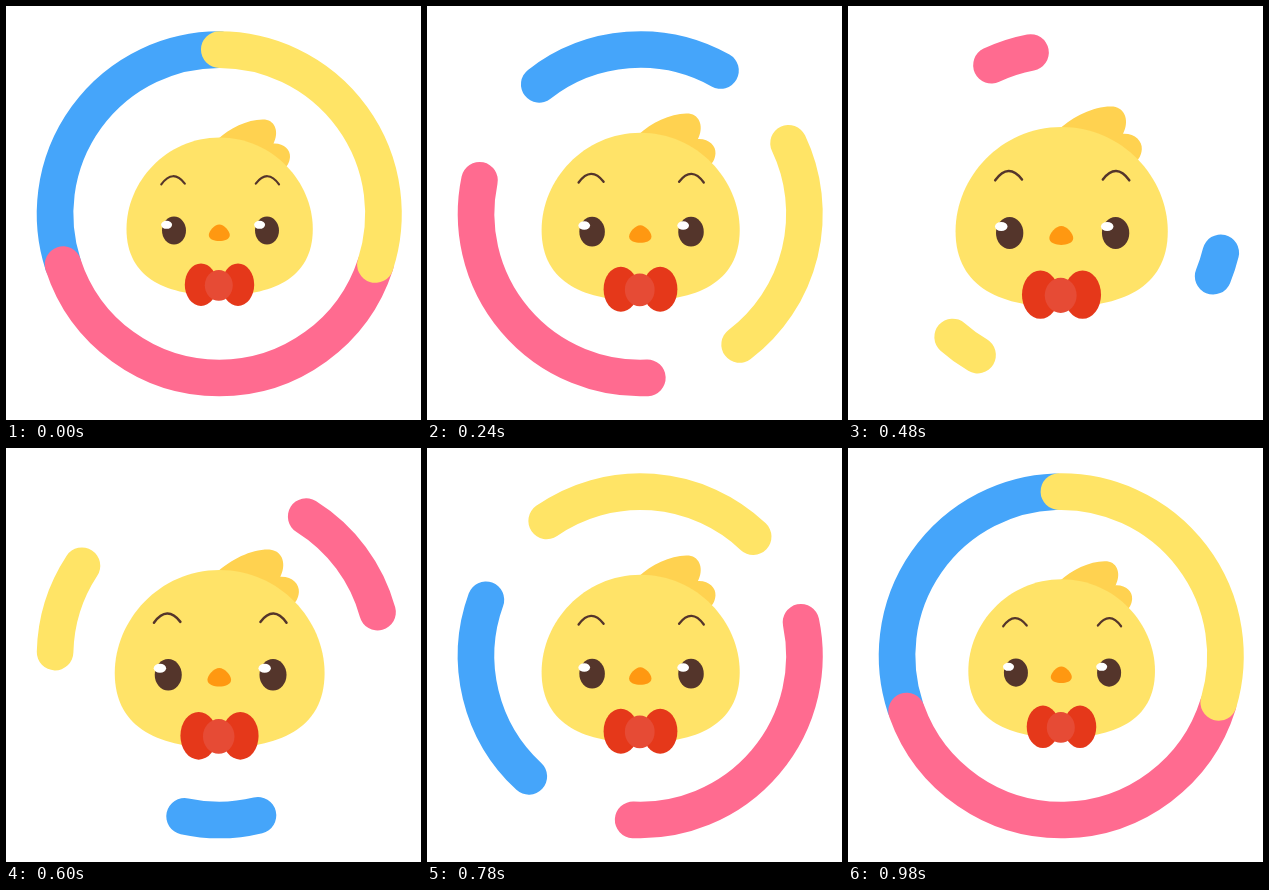
Write an HTML page that moves like this. It is 415 px wide and 414 px high and loops after 1000 ms.

```html
<!DOCTYPE html>
<html lang="en">
<head>
<meta charset="utf-8">
<title>Chick loader</title>
<style>
  html, body { margin: 0; width: 100%; height: 100%; overflow: hidden; background: #fff; }
  svg { display: block; width: 100vw; height: 100vh; }
  #ring path { fill: none; stroke-width: 36.6; stroke-linecap: round; }
  .brow { fill: none; stroke: #54352b; stroke-width: 2.2; stroke-linecap: round; }
  .dark { fill: #54352b; }
  .bow { fill: #e5381a; }
</style>
</head>
<body>
<svg viewBox="0 0 415 414">
  <g id="ring"></g>
  <g id="chick">
    <path fill="#ffd250" d="M212 133C224 122 243 112.5 259 113.5C270 115 273 127 267.5 137.5C278 137 284.5 144 284 151C283.5 157 281 160 279 162L240 170Z"/>
    <path fill="#ffe368" d="M213.5 131.5C160 131.5 120.5 176 120.5 223C120.5 274 163 289.5 213.5 289.5C264 289.5 306.8 274 306.8 223C306.8 176 267 131.5 213.5 131.5Z"/>
    <path class="brow" d="M155.3 178.3Q167 162.5 178.8 177.6"/>
    <path class="brow" d="M249.8 177.6Q261.5 162.5 273 178.3"/>
    <ellipse class="dark" cx="168" cy="224.6" rx="12" ry="14"/>
    <ellipse class="dark" cx="261" cy="224.6" rx="12" ry="14"/>
    <ellipse fill="#fff" cx="160.6" cy="218.8" rx="5.5" ry="4"/>
    <ellipse fill="#fff" cx="253.6" cy="218.8" rx="5.5" ry="4"/>
    <path fill="#ff9811" d="M213.3 218.5C218 218.5 223.8 225 223.8 229C223.8 233.5 218 235 213.3 235C208.6 235 202.8 233.5 202.8 229C202.8 225 208.6 218.5 213.3 218.5Z"/>
    <ellipse class="bow" cx="195" cy="278.7" rx="16.2" ry="21.2"/>
    <ellipse class="bow" cx="232" cy="278.7" rx="16.2" ry="21.2"/>
    <ellipse fill="#e64b35" cx="212.8" cy="279.3" rx="14" ry="15.4"/>
  </g>
</svg>
<script>
const LOOP = 1000, FPS = 30, TICK = 20;
const CX = 213.25, CY = 207.8, R = 164.2;
const PIVOT = [213.5, 207], GROW = 0.141;

const smooth = x => x * x * (3 - 2 * x);

// Cubic ease with flat handles of length a at both ends
function ease(x, a) {
  let lo = 0, hi = 1;
  for (let i = 0; i < 30; i++) {
    const s = (lo + hi) / 2, r = 1 - s;
    if (3 * r * r * s * a + 3 * r * s * s * (1 - a) + s ** 3 < x) lo = s; else hi = s;
  }
  return smooth((lo + hi) / 2);
}

// Painted back to front; angles in degrees clockwise from the top
const arcs = [
  { color: '#45a5fa', from: 252, to: 360, trim: x => ease(x, 1 / 6) },
  { color: '#ff6b90', from: 108, to: 252, trim: smooth },
  { color: '#ffe466', from: 0, to: 108, trim: smooth }
];

const ring = document.getElementById('ring');
const chick = document.getElementById('chick');
for (const arc of arcs) {
  arc.el = document.createElementNS('http://www.w3.org/2000/svg', 'path');
  arc.el.setAttribute('stroke', arc.color);
  ring.append(arc.el);
}

function point(deg) {
  const a = deg * Math.PI / 180;
  return `${(CX + R * Math.sin(a)).toFixed(3)} ${(CY - R * Math.cos(a)).toFixed(3)}`;
}

function arcPath(mid, half) {
  if (half < 0.01) return '';
  return `M${point(mid - half)}A${R} ${R} 0 0 1 ${point(mid + half)}`;
}

function draw(x) {
  const turn = 360 * smooth(x);
  for (const { el, from, to, trim } of arcs) {
    const half = (to - from) / 2 * Math.abs(1 - 2 * trim(x));
    el.setAttribute('d', arcPath((from + to) / 2 + turn, half));
  }
  const k = 1 + GROW * smooth(1 - Math.abs(1 - 2 * x));
  const [px, py] = PIVOT;
  chick.setAttribute('transform', `translate(${px} ${py}) scale(${k}) translate(${-px} ${-py})`);
}

const start = performance.now();
function frame() {
  const t = Math.max(0, performance.now() - start) % LOOP;
  const step = Math.floor(Math.floor(t / TICK) * TICK * FPS / LOOP);
  draw(step / FPS);
  requestAnimationFrame(frame);
}
frame();
</script>
</body>
</html>
```
